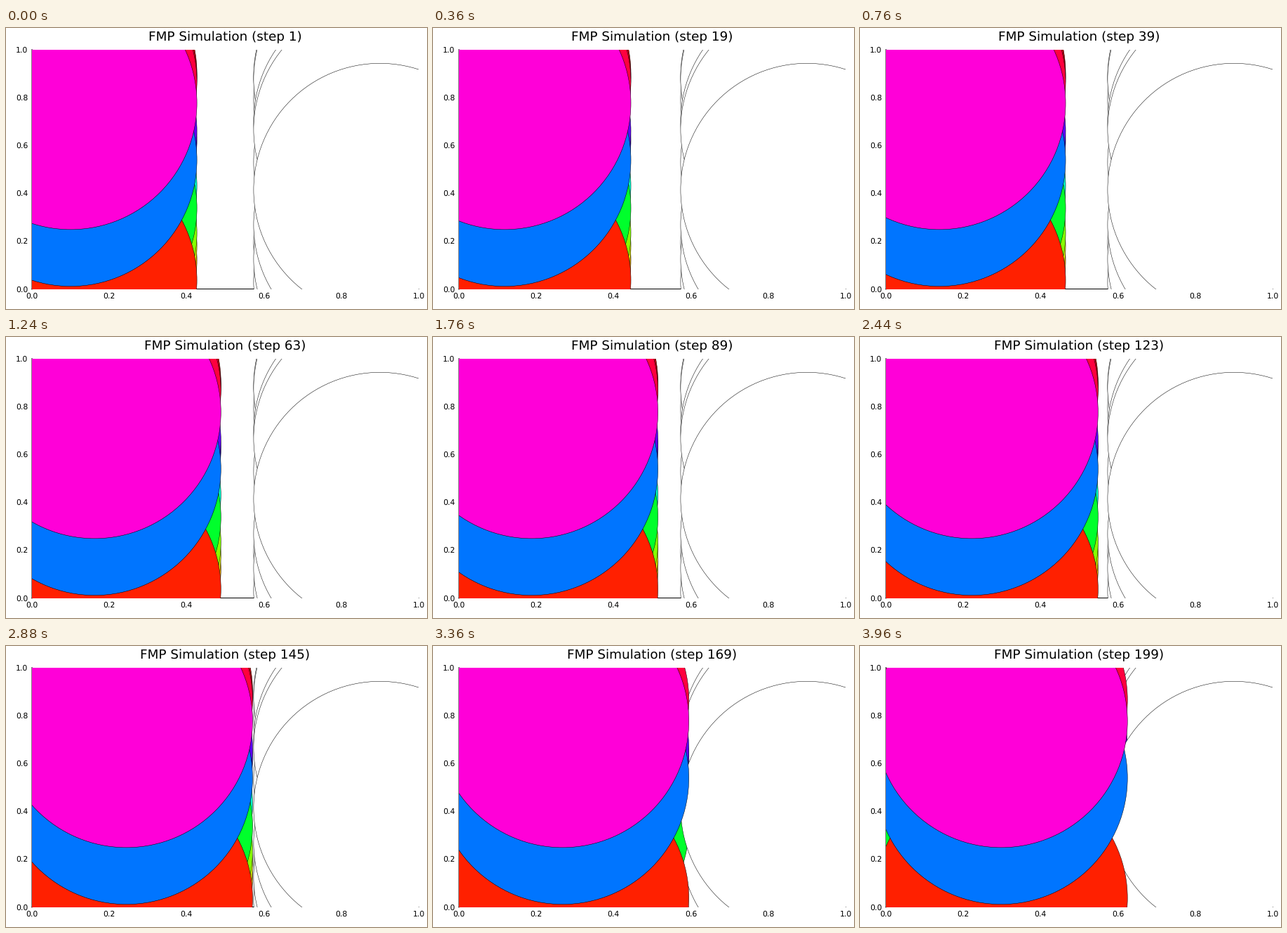
These frames come from a looping animation (600x400 px, 4 s). A matplotlib script:

```python
import colorsys

import matplotlib.pyplot as plt
from matplotlib.animation import FuncAnimation
from matplotlib.patches import Circle
from matplotlib.path import Path

plt.rcParams["font.family"] = "DejaVu Sans"
plt.rcParams["text.hinting"] = "none"

PX = 0.72                          # points per pixel at 100 dpi
LEFT, RIGHT = 37, 588
TOP, BOTTOM = 30.5, 371.5
RADIUS = 180
FRAMES, INTERVAL = 100, 40
START_X, WALL_X, SPEED = 0.1, 0.9, 0.001

# Particles from back to front: (height, moves)
PARTICLES = [
    (0.901, True), (0.882, True), (0.12, True), (0.18, True),
    (0.235, True), (0.43, True),
    (0.79, False), (0.53, False), (0.19, False), (0.03, False),
    (0.888, False), (0.875, False), (0.125, False),
    (0.70, False), (0.666, False), (0.268, False),
    (0.62, True), (0.66, True), (0.338, True), (0.865, True),
    (0.414, False),
    (0.037, True), (0.539, True), (0.776, True),
]


def to_x(v):
    return LEFT + (RIGHT - LEFT) * v


def to_y(v):
    return BOTTOM - (BOTTOM - TOP) * v


def hue_color(v):
    hue = min(max(408 * v - 7.5, 0), 360) / 360
    return colorsys.hsv_to_rgb(hue, 1, 1)


fig = plt.figure(figsize=(6, 4), dpi=100, facecolor="white")
ax = fig.add_axes([0, 0, 1, 1])
ax.set_xlim(0, 600)
ax.set_ylim(400, 0)
ax.axis("off")


def axis_line(xs, ys):
    line, = ax.plot(xs, ys, color="black", lw=PX, zorder=1)
    line.set_snap(False)


axis_line([LEFT, LEFT], [TOP, 372])
axis_line([LEFT, RIGHT], [BOTTOM, BOTTOM])

for k in range(6):
    v = k / 5
    label = f"{v:.1f}"
    ax.text(to_x(v), 385, label, fontsize=10.9 * PX, ha="center", va="baseline")
    ax.text(31.5, to_y(v) + 4, label, fontsize=10.9 * PX, ha="right", va="baseline")

title = ax.text(to_x(0.5), 18, "", fontsize=18.4 * PX, ha="center", va="baseline")

# A path clip keeps the frame's fractional edges soft
frame = Path([(LEFT, TOP), (RIGHT, TOP), (RIGHT, BOTTOM), (LEFT, BOTTOM), (LEFT, TOP)],
             closed=True)

movers = []
for order, (y, moves) in enumerate(PARTICLES):
    disc = Circle((to_x(START_X if moves else WALL_X), to_y(y)), RADIUS,
                  facecolor=hue_color(y) if moves else "white",
                  edgecolor="black", lw=0.5 * PX, zorder=2 + 0.01 * order)
    ax.add_patch(disc)
    disc.set_clip_path(frame, ax.transData)
    if moves:
        movers.append((disc, to_y(y)))


def draw(i):
    step = 2 * i + 1
    x = to_x(START_X + SPEED * (step - 1))
    for disc, y in movers:
        disc.center = (x, y)
    title.set_text(f"FMP Simulation (step {step})")
    return [disc for disc, _ in movers] + [title]


anim = FuncAnimation(fig, draw, frames=FRAMES, interval=INTERVAL,
                     init_func=lambda: draw(0), repeat=True, repeat_delay=0)
plt.show()
```
